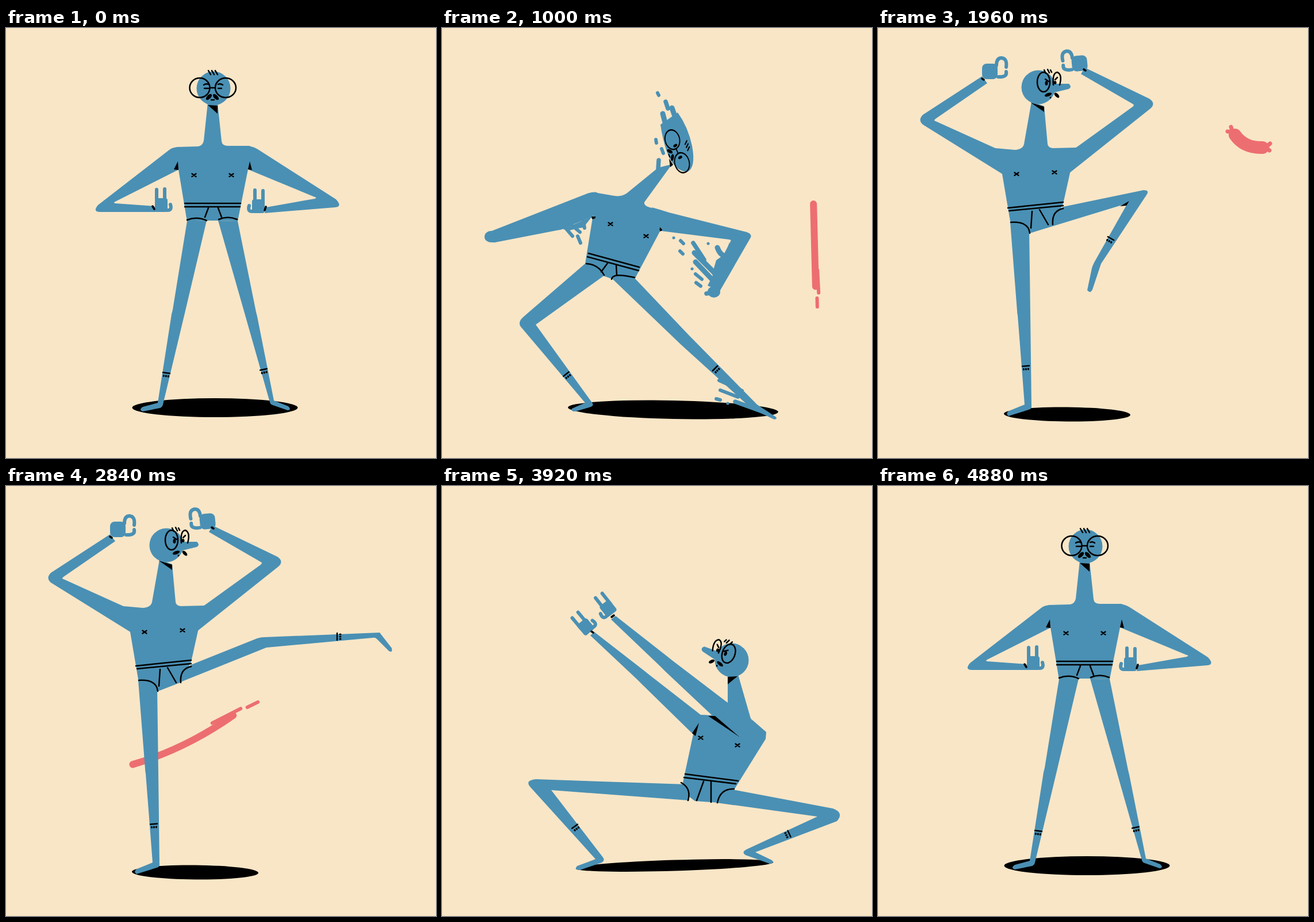
An HTML page for the animation above (4.92 s loop, 748 by 748 pixels).

```html
<!DOCTYPE html>
<html lang="en">
<head>
<meta charset="utf-8">
<title>Slow motion fighter</title>
<style>
html, body { margin: 0; width: 100%; height: 100%; overflow: hidden; background: #f9e6c7; }
svg { display: block; width: 100vw; height: 100vh; }
</style>
</head>
<body>
<svg id="stage" viewBox="0 0 748 748" stroke-linecap="round" stroke-linejoin="round"></svg>
<script>
const LOOP = 4920, STEP = 40;
const BLUE = '#4a90b4', PINK = '#ed6e70';
const stage = document.getElementById('stage');

// Every pose uses the same path structure per part, so parts can be blended.
const stand = {
  look: 'front', grip: 'horns',
  head: '361 105 0',
  hands: '270 308 0 439 310 0',
  socks: '279 600 7 448 594 -12',
  shadow: '363.5 660.5 144 16.5 0',
  body: 'M351 130L368 130L375 197Q376 205 386 205L424 205L421 246L403 336L375 335L345 335L315 337L300 246L297 207L334 206Q342 205 344 196Z',
  armL: 'M302 207Q290 207 284 212L160 308Q150 320 164 320L262 320L258 310L190 305Q186 304 190 302L301 246Z',
  armR: 'M420 205Q430 206 438 211L574 298Q586 311 572 312L450 322L452 312L537 297Q542 295 537 294L421 246Z',
  legL: 'M315 336L290 490Q289 494 288 498L264 652L238 659Q230 664 238 667L268 661Q272 659 273 655L311 496L349 335Z',
  legR: 'M403 336L435 494Q436 498 437 502L466 648L491 658Q497 664 490 665L464 656Q460 655 459 651L415 496L369 335Z',
  lines: 'M311 305L408 305M311 311L407 311M315 334Q332 327 349 335M370 333Q386 326 402 333M352 313L346 329M369 313L375 329',
  chest: '327 256 392 256',
  shade: 'M299 232L292 246L300 247ZM424 232L428 247L421 246ZM351 134L368 135L368 149ZM361 134L361 134L361 134Z',
  cuffs: 'M255 310L258 315M452 311L450 317'
};

const lunge = {
  look: 'open', grip: 'stub',
  head: '414 221 66',
  hands: '85 363 0 473 459 0',
  socks: '216 602 -38 475 592 -45',
  shadow: '402 664 183 16 1.2',
  body: 'M376 243L400 237L352 303Q351 308 358 311L395 322L380 352L335 437L300 438L283 432L249 410L262 330L265 286L300 292Q313 294 322 287Z',
  armL: 'M270 286Q262 284 250 289L84 354Q70 360 76 369L88 373L92 373L200 352Q215 350 230 341L262 328Z',
  armR: 'M365 312Q380 316 395 321L530 355Q541 359 536 366L483 458L462 448L502 371Q504 369 500 368L381 353Z',
  legL: 'M250 409L141 503Q130 513 139 522L249 652L226 662Q223 667 232 667L259 659Q264 657 262 653L163 516L283 430Z',
  legR: 'M335 435L431 536Q434 539 437 542L548 655L580 676Q585 680 578 681L540 663Q537 661 534 658L416 551L297 437Z',
  lines: 'M255 392L343 416M253 398L342 422M251 410Q272 411 282 430M295 437Q297 425 335 434M288 409L277 424M303 412L304 430',
  chest: '293 341 355 362',
  shade: 'M260 328L268 328L262 333ZM379 346L383 352L379 354ZM395 227L402 238L397 242ZM398 235L398 235L398 235Z',
  cuffs: 'M262 330L265 330M380 350L381 351'
};

const crane = {
  look: 'side', grip: 'hook',
  head: '279 103 0',
  hands: '195 75 0 350 61 -6',
  socks: '257 588 -4 405 366 30',
  shadow: '329 672 110 12.5 0.5',
  body: 'M267 128L289 136L295 202Q296 208 304 209L345 208L334 252L322 306L303 342L264 357L231 342L216 254L204 209L238 212Q252 211 254 202Z',
  armL: 'M214 212Q207 211 204 209L100 162Q96 161 100 158L190 96L181 84L78 151Q69 160 78 168L218 255Z',
  armR: 'M335 211Q341 210 346 207L443 137Q447 134 443 132L353 80L360 69L472 123Q484 131 474 140L332 253Z',
  legL: 'M230 338L242 492Q242 496 243 500L255 655L228 666Q221 671 227 675L262 664Q267 663 267 659L265 500L263 350Z',
  legR: 'M322 311L462 282Q472 282 468 289L388 410L373 455Q369 463 364 456L372 418Q373 414 376 408L434 305L264 357Z',
  lines: 'M226 313L322 303M228 318L322 309M231 338Q262 336 264 357M304 342Q302 318 322 314M268 319L266 348M281 316L296 342',
  chest: '241 254 307 251',
  shade: 'M216 254L216 254L216 254ZM334 252L334 252L334 252ZM266 130L289 137L289 146ZM437 301L421 310L432 309Z',
  cuffs: 'M181 88L184 90M358 72L361 74'
};

const kick = { ...crane,
  socks: '257 588 -4 576 262 -90',
  legR: 'M322 311L437 265Q443 263 449 263L650 255L671 282Q673 291 666 287L645 266Q642 263 638 264L453 281L264 357Z',
  shade: 'M216 254L216 254L216 254ZM334 252L334 252L334 252ZM266 130L289 137L289 146ZM440 273L440 273L440 273Z'
};

const squat = {
  look: 'back', grip: 'fist',
  head: '523 312 14',
  hands: '328 397 0 637 384 -70',
  socks: '231 592 -36 604 605 65',
  shadow: '404.5 660 172 9.5 -1.8',
  body: 'M513 338L531 338L545 403Q546 410 552 411L575 420L550 472L512 532L482 551L440 548L418 530L440 462L464 400L494 402Q508 405 510 392Z',
  armL: 'M445 470Q443 466 440 463L400 437Q390 431 380 425L345 402L334 411L380 447Q390 455 400 463L428 486Z',
  armR: 'M550 412Q575 416 590 428L668 484Q672 486 669 481L633 402L645 397L702 500Q706 509 694 511L550 470Z',
  legL: 'M425 519L163 510Q144 512 153 523L267 649L235 661Q229 668 240 668L278 655Q284 651 280 646L190 529L430 547Z',
  legR: 'M500 527L680 561Q700 568 687 583L545 637L574 651Q579 656 570 657L528 642Q520 637 530 632L653 575L478 551Z',
  lines: 'M427 502L519 515M425 508L516 520M421 517Q438 526 431 547M484 551Q485 527 508 527M459 515L447 548M472 516L472 550',
  chest: '469 440 533 454',
  shade: 'M441 462L425 481L433 488ZM546 466L553 469L550 473ZM513 342L531 341L514 352ZM504 402L511 404L510 416Z',
  cuffs: 'M335 408L339 411M636 399L645 396'
};

const thrust = { ...squat,
  grip: 'horns',
  head: '504 303 20',
  hands: '250 245 -40 289 213 -38',
  body: 'M497 330L515 328L536 401Q537 406 541 408L564 428L563 440L507 530L482 551L440 548L416 530L437 432L462 399L475 398Q497 395 497 378Z',
  armL: 'M465 399Q460 398 450 398L360 328Q355 324 350 320L265 254L258 260L340 337Q345 342 350 347L437 432Z',
  armR: 'M520 405Q510 388 497 377L400 303Q395 299 390 295L302 226L294 232L380 314Q385 319 390 324L490 418Z',
  lines: 'M423 501L515 513M421 507L511 518M416 516Q434 526 428 547M479 551Q484 526 508 527M455 514L443 547M468 515L468 550',
  chest: '450 438 514 451',
  shade: 'M447 412L435 430L441 435ZM463 400L475 400L518 437ZM497 332L514 331L497 345ZM510 404L510 404L510 404Z',
  cuffs: 'M260 253L263 255M295 228L299 225'
};

const out = u => 1 - (1 - u) ** 3;
const windUp = u => u < .78 ? -.04 * Math.sin(u / .78 * Math.PI) : out((u - .78) / .22);
const moves = [
  [240, 960, stand, lunge, windUp],
  [1720, 1880, lunge, crane, out],
  [2620, 2760, crane, kick, out],
  [2920, 3120, kick, squat, out],
  [3560, 3720, squat, thrust, out],
  [4280, 4600, thrust, stand, out]
];

function mix(a, b, u) {
  const end = b.match(/-?[\d.]+/g);
  let i = 0;
  return a.replace(/-?[\d.]+/g, n => +(n * (1 - u) + end[i++] * u).toFixed(2));
}

function poseAt(t) {
  let pose = stand;
  for (const [from, to, a, b, ease] of moves) {
    if (t < from) break;
    if (t >= to) { pose = b; continue; }
    const u = ease((t - from) / (to - from));
    pose = {};
    for (const k in a) {
      pose[k] = k === 'look' || k === 'grip' ? (u < .5 ? a : b)[k] : mix(a[k], b[k], u);
    }
  }
  return pose;
}

const nums = s => s.split(' ').map(Number);
const fill = (d, c) => `<path d="${d}" fill="${c}"/>`;
const line = (d, w = 2.5, c = '#000') => `<path d="${d}" fill="none" stroke="${c}" stroke-width="${w}"/>`;
const oval = (x, y, rx, ry, a = 0, c = '#000') =>
  `<ellipse cx="${x}" cy="${y}" rx="${rx}" ry="${ry}" transform="rotate(${a} ${x} ${y})" fill="${c}"/>`;
const lens = (x, y, rx, ry) =>
  `<ellipse cx="${x}" cy="${y}" rx="${rx}" ry="${ry}" fill="none" stroke="#000" stroke-width="2.5"/>`;
const put = (x, y, a, art, rest = '') =>
  `<g transform="translate(${x} ${y}) rotate(${a}) ${rest}">${art}</g>`;

const front = lens(-24, -1, 17.5, 17) + lens(21, -1, 18, 17) +
  line('M-6 -1H3M-4 20H1M-9 -31L-5 -24M-3 -31L1 -24M3 -31L7 -24') +
  oval(-8, 15, 6.5, 3.3, -45) + oval(4, 15, 6.5, 3.3, 45);
const side = fill('M20 -6L53 -6Q59 -1 53 3L24 10Z', BLUE) + lens(9, -9, 11, 17) +
  line('M26 -4Q24 -25 33 -26Q42 -22 37 -4M12 -14L18 -10M29 -13L33 -17M10 -30L13 -24M16 -31L19 -25M21 -30L23 -26') +
  oval(14, -7, 2.5, 4) + oval(29, -8, 2.5, 3) +
  oval(17, 13, 6.5, 2.8, -20) + oval(32, 14, 5.5, 2.8, 45) + oval(21, 18, 1.5, 1.5);
const faces = {
  front: front + line('M-17 -6Q-13 -9 -9 -7M-16 0H-9M8 -7Q12 -9 16 -6M8 0H14'),
  open: front + oval(-12, -2, 2.5, 5) + oval(11, -2, 2.5, 5),
  side
};

const grips = {
  horns: '<rect x="-11" y="-12" width="22" height="24" rx="4" fill="' + BLUE + '"/>' +
    line('M-8 -4V-27M6 -4V-28M6 8Q20 12 16 -1', 6, BLUE),
  hook: '<rect x="-14" y="-13" width="27" height="27" rx="8" fill="' + BLUE + '"/>' +
    line('M11 -10Q11 -23 20 -23Q30 -22 28 -7M28 1Q30 11 14 10', 6, BLUE),
  fist: oval(0, 2, 14.5, 13, 0, BLUE) + line('M0 0L-7 -17M5 0L14 -12', 10, BLUE),
  stub: oval(0, 0, 11, 10, 0, BLUE)
};

const sock = line('M-6 0H6') + line('M-4 5V6M0 5V6M4 5V6', 3);

// Trails of the lunge: solid roots, then streaks by width.
const trails =
  fill('M210 350L222 352L234 349L246 347L261 328ZM500 372L496 400L474 440L470 428L477 404L494 392Z', BLUE) +
  line('M400 139L410 168M384 149L392 180M439 391L476 428M441 407L478 446M479 382Q484 396 494 397', 9, BLUE) +
  line('M389 128L393 140M437 374L456 403M377 230L376 245M460 462L478 458M510 650L560 668', 7.5, BLUE) +
  line('M375 113L377 117M372 194L373 200M382 210L385 218M215 348L227 362M228 345L240 355M246 335L248 348M236 362L241 374M415 370L420 375M414 388L419 393M441 428L452 437M442 443L450 449M482 613L522 631M484 630L515 642M477 645L484 647', 6, BLUE) +
  line('M403 365h.1M463 375h.1M435 419h.1M497 653h.1', 5, BLUE);

function headArt(t, p) {
  const [x, y, a] = nums(p.head);
  if (p.look === 'open' && t < 1040) {
    return fill('M380 168L410 147Q428 172 435 205Q442 243 427 250Q404 250 391 215Q384 195 380 168Z', BLUE) +
      put(409, 216, -12, faces.open, 'scale(.74 .98) rotate(76)');
  }
  const back = p.look === 'back';
  return oval(x, y, 29.5, 29.5, 0, BLUE) +
    put(x, y, a, faces[back ? 'side' : p.look], back ? 'scale(-1 1)' : '');
}

const whole = line('M-24 -9Q-8 14 24 13', 22, PINK) +
  line('M-28 -14L-37 -15M-28 -14L-31 -23M30 12L37 6M30 13L36 18', 7, PINK);

// Streak with its head at the given place; b is the solid share of its length.
function streak(x, y, a, len, b, bend = 0) {
  const k = n => (n * len).toFixed(1);
  const s = b < .6 ? -1 : 1;
  let art = line(`M0 6Q${bend} ${k(b / 2)} 0 ${k(b)}`, 12, PINK) +
    line(`M${s * 4} ${k(b - .15)}L${s * 5} ${k(b + (1 - b) * .3)}M2 ${k(b + .11)}L2 ${k(b + .19)}`, 6, PINK);
  if (b < .6) art += line(`M-6 ${k(.72)}L-7 ${k(.8)}M-2 ${k(.89)}v3M0 ${k(.98)}v1`, 5, PINK);
  return put(x, y, a, art);
}

function sausage(t) {
  if (t < 440) return '';
  if (t < 960) {
    const u = (t - 440) / 520;
    return put(790 - 140 * u, 330 + 260 * u * u, 300 * u, whole);
  }
  if (t < 1080) return streak(646, 300 - 3 * (t - 1000), -1.5, 187, .8);
  if (t < 2760) {
    const d = t - 1960;
    return put(645 + 3e-5 * d * d, 195 + (d > 0 ? 1e-4 * d * d : 0), d * .1, whole);
  }
  if (t < 2880) {
    const d = t - 2840;
    return streak(215 - 5.2 * d, 487 + 2.6 * d, -116, 257, .78, -16);
  }
  if (t < 3360) {
    const u = (t - 2880) / 480;
    return put(118 + 20 * u, 420 + 60 * u * u, 40 - 120 * u, whole);
  }
  if (t < 3440) return streak(141, 147 - 3.7 * (t - 3400), 3, 217, .5);
  if (t < 3680) return put(122 - (t - 3440) * .03, 52, (t - 3440) * .1, whole);
  if (t < 3720) return streak(112, -90, 3, 217, .5);
  return '';
}

function draw(t) {
  const p = poseAt(t);
  const [lx, ly, la, rx, ry, ra] = nums(p.hands);
  const s = nums(p.socks), c = nums(p.chest);
  const cross = (x, y) => line(`M${x - 3.5} ${y - 2.5}l7 5m0 -5l-7 5`, 2.3);
  const glow = p.grip === 'fist' && t >= 3320
    ? oval(328, 392, 25, 24, 0, '#fff') + oval(633, 384, 26, 25, 0, '#fff') : '';
  stage.innerHTML =
    oval(...nums(p.shadow)) + sausage(t) + glow +
    ['legL', 'legR', 'armL', 'armR', 'body'].map(k => fill(p[k], BLUE)).join('') +
    put(lx, ly, la, grips[p.grip]) + put(rx, ry, ra, grips[p.grip], 'scale(-1 1)') +
    (t >= 960 && t < 1040 ? trails : '') +
    headArt(t, p) + fill(p.shade, '#000') +
    line(p.lines, 2.5) + line(p.cuffs, 3.5) +
    cross(c[0], c[1]) + cross(c[2], c[3]) +
    put(s[0], s[1], s[2], sock) + put(s[3], s[4], s[5], sock);
}

const begin = performance.now();
let shown = -1;
function tick() {
  const t = Math.floor((performance.now() - begin) % LOOP / STEP) * STEP;
  if (t !== shown) draw(shown = t);
  requestAnimationFrame(tick);
}
tick();
</script>
</body>
</html>
```
